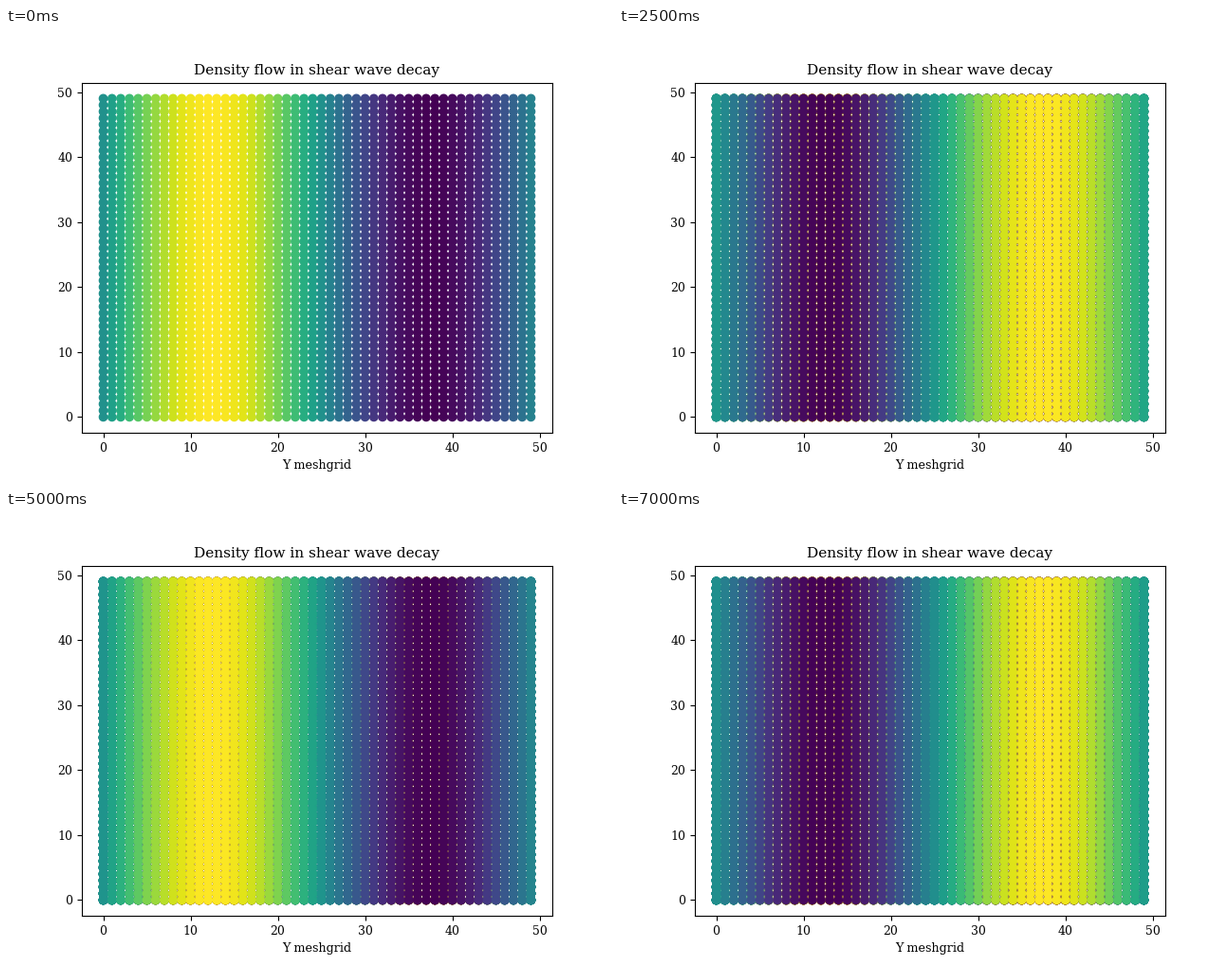
A matplotlib script for the animation above (7.5 s loop, 640 by 480 pixels).

```python
import numpy as np
import matplotlib.pyplot as plt
from matplotlib.animation import FuncAnimation

FRAMES = 15
INTERVAL = 500
N = 50                   # lattice sites per side
STEPS = 200              # lattice steps between snapshots
SOUND = 1 / np.sqrt(3)   # lattice speed of sound

plt.rcParams["font.family"] = "DejaVu Serif"

fig, ax = plt.subplots(figsize=(6.4, 4.8), dpi=100)
x, y = np.meshgrid(np.arange(N), np.arange(N))


def density(i):
    """Damped standing sound wave with a fading second harmonic."""
    wave = np.sin(2 * np.pi * y / N)
    phase = 2 * np.pi / N * SOUND * STEPS * i
    steepening = -0.34 * 0.78 ** i * np.sin(2 * phase)
    return np.cos(phase) * wave + steepening * wave ** 2


# Snapshots pile up on the same axes, so older ones show at the dot edges.
layers = [ax.scatter(y, x, c=density(i), cmap="viridis") for i in range(FRAMES)]

ax.set_title("Density flow in shear wave decay", fontsize=11.05)
ax.set_xlabel("Y meshgrid", fontsize=9.15)
ax.tick_params(labelsize=8.9)


def update(i):
    for k, layer in enumerate(layers):
        layer.set_visible(k <= i)
    return layers


anim = FuncAnimation(fig, update, frames=FRAMES, interval=INTERVAL,
                     init_func=lambda: update(0), repeat=True, repeat_delay=0)
plt.show()
```
